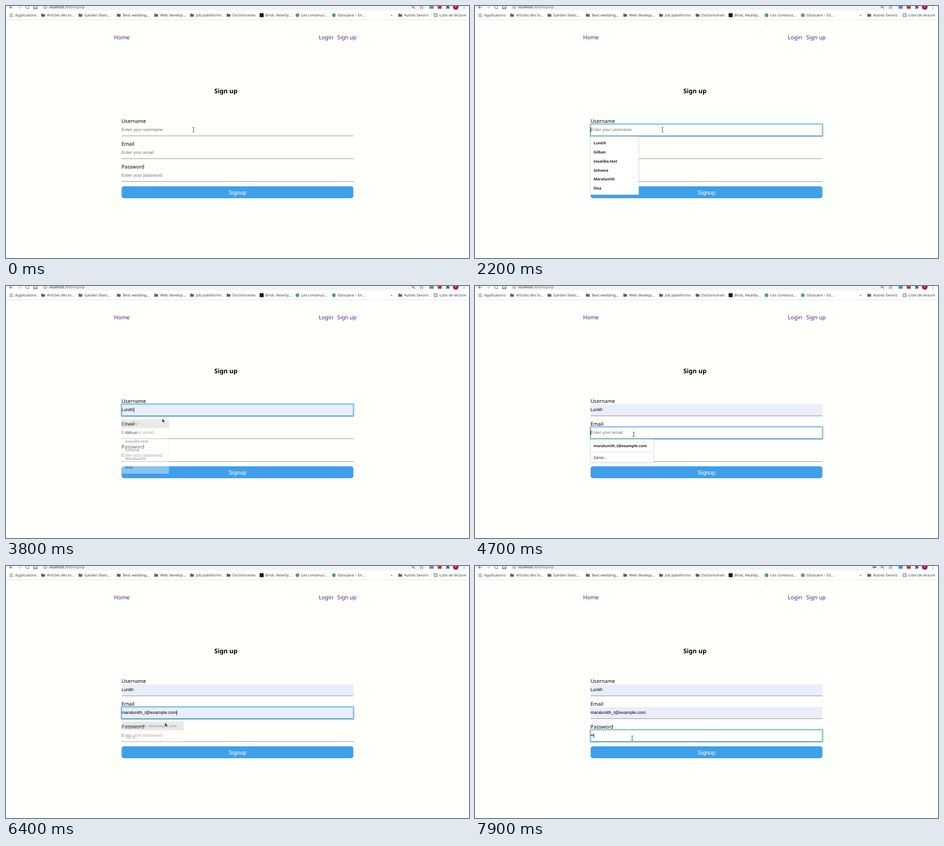
An HTML page that plays this animation: 1015x552 px, repeating every 8 s.

```html
<!DOCTYPE html>
<html lang="fr">
<head>
<meta charset="utf-8">
<title>Sign up</title>
<style>
  html, body { margin: 0; width: 100%; height: 100%; overflow: hidden; background: #fffffc; }
  svg { display: block; width: 1015px; height: 552px; text-rendering: geometricPrecision; }
  text { font-family: "Noto Sans", "Open Sans", sans-serif; white-space: pre; }
  .input { font-family: "Liberation Sans", Arial, sans-serif; font-size: 9.7px; }
  .hint { fill: #757575; }
  .mark { font-size: 8.2px; fill: #3c4043; }
  .nav { font-size: 12px; fill: #551a8b; }
  .label { font-size: 11.05px; }
  .item { font-size: 8.3px; font-weight: 600; fill: #202124; }
</style>
</head>
<body>
<svg id="stage" viewBox="0 0 1015 552"></svg>
<script>
const LOOP = 8000;
const NAME = "Lunith";
const MAIL = "maralunith_t@example.com";
const stage = document.getElementById("stage");

function add(tag, attrs = {}, parent = stage) {
  const el = document.createElementNS("http://www.w3.org/2000/svg", tag);
  for (const key in attrs) el.setAttribute(key, attrs[key]);
  parent.append(el);
  return el;
}
function text(x, y, str, cls, attrs = {}, parent = stage) {
  const el = add("text", { x, y, class: cls, ...attrs }, parent);
  el.textContent = str;
  return el;
}
const rect = (x, y, width, height, fill, attrs = {}, parent = stage) =>
  add("rect", { x, y, width, height, fill, ...attrs }, parent);
const circle = (cx, cy, r, fill, attrs = {}, parent = stage) =>
  add("circle", { cx, cy, r, fill, ...attrs }, parent);
const line = (d, stroke = "#5f6368", width = 1.1, parent = stage) =>
  add("path", { d, stroke, "stroke-width": width, fill: "none" }, parent);
const show = (el, on) => el.setAttribute("visibility", on ? "visible" : "hidden");

// Browser bars
rect(0, 0, 1015, 30, "#fff");
rect(76, -14, 846, 23.5, "#f1f3f4", { rx: 11 });
rect(0, 30, 1015, 1, "#dfe0e2");
line("M15.5 2.5H8M11.5 -1.5L7.8 2.5L11.5 6.3");
line("M25 2.5H32.5M29 -1.5L32.7 2.5L29 6.3", "#babcbe");
line("M50 0A3.7 3.7 0 1 0 50.3 3.6M50.5 -2V1H47.5");
line("M60.5 2V6.4H63V3.5H65.5V6.4H68V2M59.3 2.6L64.2 -1.7L69.2 2.6");
circle(86, 2.3, 3.3, "none", { stroke: "#5f6368", "stroke-width": .8 });
line("M86 1.8V4.3M86 .3V1.1", "#5f6368", .8);
const url = text(95, 5.3, "", "", { "font-size": 7.5, fill: "#6b6f73" });
add("tspan", { fill: "#202124" }, url).textContent = "localhost";
add("tspan", {}, url).textContent = ":3000/signup";

const key = add("g");
circle(874, 2.5, 1.7, "none", { stroke: "#4a4d51", "stroke-width": 1.3 }, key);
line("M875.7 2.5H880M878.6 2.5V4.6", "#4a4d51", 1.4, key);

circle(892.6, 1.6, 2.6, "none", { stroke: "#5f6368", "stroke-width": 1 });
line("M894.5 3.5L897 6.2M891.4 1.6H893.8", "#5f6368", 1);
line("M911 -1.8L912.1 1H914.6L912.6 2.7L913.4 5.6L911 4L908.6 5.6L909.4 2.7L907.4 1H909.9Z", "#5f6368", .8);
rect(928.5, -2, 9, 8, "#4a8fce");
rect(946.5, -2, 8.5, 8, "#bd3540");
add("path", { d: "M964.5 0H967V-2H969V0H971.5V2.2H972.6V4H971.5V6.3H969.2V5H967.2V6.3H964.5V4H966V2.2H964.5Z", fill: "#5f6368" });
circle(986, 2, 6.2, "#b1125f");
text(986, 4.4, "L", "", { "font-size": 6.5, fill: "#f3d5e3", "text-anchor": "middle" });
[-.8, 2.4, 5.6].forEach(y => circle(1004, y, .9, "#5f6368"));

// Bookmarks
const dots = ["#d94b41", "#d94b41", "#e0a030", "#3f9b55", "#4a7fe0", "#e0a030", "#3f9b55", "#4a7fe0", "#4a7fe0"];
dots.forEach((c, i) => rect(8 + i % 3 * 2.9, 16.8 + Math.floor(i / 3) * 2.7, 1.8, 1.8, c));
function folder(x) {
  add("path", { d: `M${x} 17.6q0-.9.9-.9h2.3l1 1.1h3.2q.8 0 .8.8v4q0 .8-.8.8h-6.6q-.8 0-.8-.8z`, fill: "#5f6368" });
}
const marks = [
  [20, "Applications"], [90, "Articles des bi…", 1], [172, "Garden Sketc…", 1],
  [256, "Best wedding…", 1], [338, "Web develop…", 1], [416.5, "Job plateforms", 1],
  [496.5, "Dictionnaries", 1], [568.7, "Brisk, Nearby…"], [647.3, "Les contenus…"],
  [727.3, "Glossaire – En…"], [843.3, "»"], [873, "Autres favoris", 1], [950.3, "Liste de lecture"]
];
for (const [x, str, hasFolder] of marks) {
  text(x, 23.1, str, "mark");
  if (hasFolder) folder(x - 12.8);
}
rect(556, 15.8, 8.8, 8.6, "#191919");
circle(639, 20.2, 3.9, "#3fae49");
circle(718.7, 20.2, 3.9, "#3fae49");
rect(931.6, 15.5, .8, 9, "#dadce0");
rect(938.5, 16.8, 6.6, 6.6, "none", { stroke: "#5f6368", "stroke-width": 1 });
line("M940 18.7H941M942 18.7H944M940 20.2H941M942 20.2H944M940 21.7H941M942 21.7H944", "#5f6368", .7);

// Page
text(237, 72.7, "Home", "nav");
text(685.8, 72.7, "Login", "nav");
text(726.3, 72.7, "Sign up", "nav");
text(482, 190.7, "Sign up", "", { "font-size": 13.7, "font-weight": 700, "text-anchor": "middle" });

const fields = ["Username", "Email", "Password"].map((label, i) => {
  const top = 259 + 50 * i;
  const fill = rect(253.5, top, 508, 25.5, "#e8eefa");
  text(253.3, top - 2.8, label, "label");
  const hint = text(253.3, top + 15.3, "Enter your " + label.toLowerCase(), "input hint");
  const value = text(253.3, top + 15.3, "", "input");
  rect(253.5, top + 25, 508, 1, "#858583");
  return { top, fill, hint, value };
});
rect(253.5, 395, 508, 26, "#3e9fea", { rx: 5 });
text(507.5, 412.6, "Signup", "input", { "text-anchor": "middle", style: "font-size:12.5px;fill:#fff" });

const ring = add("g", { fill: "none", stroke: "#45a5dc" });
[[5.5, .12], [3.2, .25], [1.1, 1]].forEach(([w, o]) =>
  rect(253, 258.5, 509, 26.5, "none", { rx: 1, "stroke-width": w, "stroke-opacity": o }, ring));
line("M253.5 284.8H761.5", "#4b7d99", .9, ring);

// Suggestion lists
function makeMenu(y, w, h) {
  const el = add("g");
  rect(252.5, y, w + 1, h + 1.2, "#000", { opacity: .1, rx: 1 }, el);
  rect(253, y, w, h, "#fff", { stroke: "#c9c9c9", "stroke-width": .7 }, el);
  const hover = rect(253, y + 4.3, w, 19.7, "#c6c6c6", {}, el);
  return { el, hover, cx: 253 + w / 2, cy: y + h / 2 };
}
const names = makeMenu(285.8, 106, 127.5);
[NAME, "Gilban", "essai@a.test", "Solvena", "Maralunith", "Ona"].forEach((str, i) =>
  text(260, 303.2 + 19.8 * i, str, "item", {}, names.el));
const mails = makeMenu(335.8, 139, 51);
text(260, 353, MAIL, "item", {}, mails.el);
rect(253, 363.8, 139, .8, "#d5d5d5", {}, mails.el);
text(260, 379, "Gérer…", "item", { style: "font-weight:400;font-size:8.7px" }, mails.el);
const menus = [names, mails];

const caret = rect(0, 0, .9, 11, "#111");
const beam = add("g");
line("M-2 -5Q0 -5 0 -4Q0 -5 2 -5M0 -4V4M-2 5Q0 5 0 4Q0 5 2 5", "#333", 1, beam);
const arrow = add("path", { d: "M0 0V8L1.9 6.4L3.2 9.3L4.6 8.7L3.3 5.9H5.7Z", fill: "#1b1b1b", stroke: "#fff", "stroke-width": .4 });

// Each step changes part of the state: 1 = preview, 2 = filled; fade = closing list
const I = "beam", A = "arrow";
const steps = [
  [0, { focus: -1, user: 0, mail: 0, pass: 0, menu: -1, hover: 0, fade: 0, caret: 0, key: 0, mouse: [I, 411, 271] }],
  [900, { focus: 0, menu: 0, caret: 253.2 }],
  [1400, { caret: 0 }],
  [2200, { caret: 253.2 }],
  [2600, { caret: 0 }],
  [2800, { mouse: [I, 394, 275] }],
  [2900, { mouse: [I, 364, 282] }],
  [3000, { mouse: [A, 347, 291], hover: 1, user: 1 }],
  [3100, { mouse: [A, 342.5, 290.5], caret: 253.2 }],
  [3500, { caret: 0 }],
  [3800, { user: 2, fade: 1, caret: 280.2 }],
  [3900, { menu: -1, fade: 0, hover: 0, mouse: [A, 342.5, 293] }],
  [4000, { mouse: [A, 343, 300] }],
  [4100, { mouse: [I, 345, 313] }],
  [4200, { mouse: [I, 347, 321] }],
  [4300, { mouse: [I, 348, 325], caret: 0 }],
  [4700, { focus: 1, menu: 1, caret: 253.2 }],
  [5200, { caret: 0 }],
  [5500, { mouse: [I, 348.5, 331] }],
  [5600, { mouse: [A, 348.5, 342], hover: 1, mail: 1 }],
  [5700, { mouse: [A, 348.5, 344] }],
  [6000, { mouse: [A, 348.5, 343.3] }],
  [6400, { mail: 2, fade: 1, caret: 374 }],
  [6500, { menu: -1, fade: 0, hover: 0, mouse: [A, 348, 352] }],
  [6600, { mouse: [A, 346, 364] }],
  [6700, { mouse: [I, 344.5, 375] }],
  [6900, { mouse: [I, 344.5, 377], caret: 0 }],
  [7100, { focus: 2, caret: 253.2 }],
  [7600, { pass: 1, caret: 256.6 }],
  [7900, { pass: 2, caret: 260, key: 1 }]
];

function setField(field, str, mode) {
  field.value.textContent = mode ? str : "";
  field.value.style.fontSize = mode === 1 ? "8.1px" : "9.7px";
  show(field.hint, !mode);
}

function draw(time) {
  const s = Object.assign({}, ...steps.filter(([at]) => at <= time).map(step => step[1]));
  setField(fields[0], NAME, s.user);
  setField(fields[1], MAIL, s.mail);
  setField(fields[2], "•".repeat(s.pass), s.pass && 2);
  [s.user, s.mail, 0].forEach((on, i) => show(fields[i].fill, on));

  show(ring, s.focus >= 0);
  ring.setAttribute("transform", `translate(0 ${50 * Math.max(0, s.focus)})`);

  menus.forEach((m, i) => {
    const open = s.menu === i;
    m.el.style.display = open ? "" : "none";
    show(m.hover, open && s.hover);
    m.el.setAttribute("opacity", s.fade ? .38 : 1);
    const k = s.fade ? .965 : 1;
    m.el.setAttribute("transform", `translate(${m.cx} ${m.cy}) scale(${k}) translate(${-m.cx} ${-m.cy})`);
  });

  show(caret, s.caret);
  caret.setAttribute("x", s.caret);
  caret.setAttribute("y", 266 + 50 * Math.max(0, s.focus));
  show(key, s.key);

  const [kind, x, y] = s.mouse;
  show(beam, kind === I);
  show(arrow, kind === A);
  (kind === I ? beam : arrow).setAttribute("transform", `translate(${x} ${y})`);
}

const start = performance.now();
function tick() {
  draw((performance.now() - start) % LOOP);
  requestAnimationFrame(tick);
}
tick();
</script>
</body>
</html>
```
